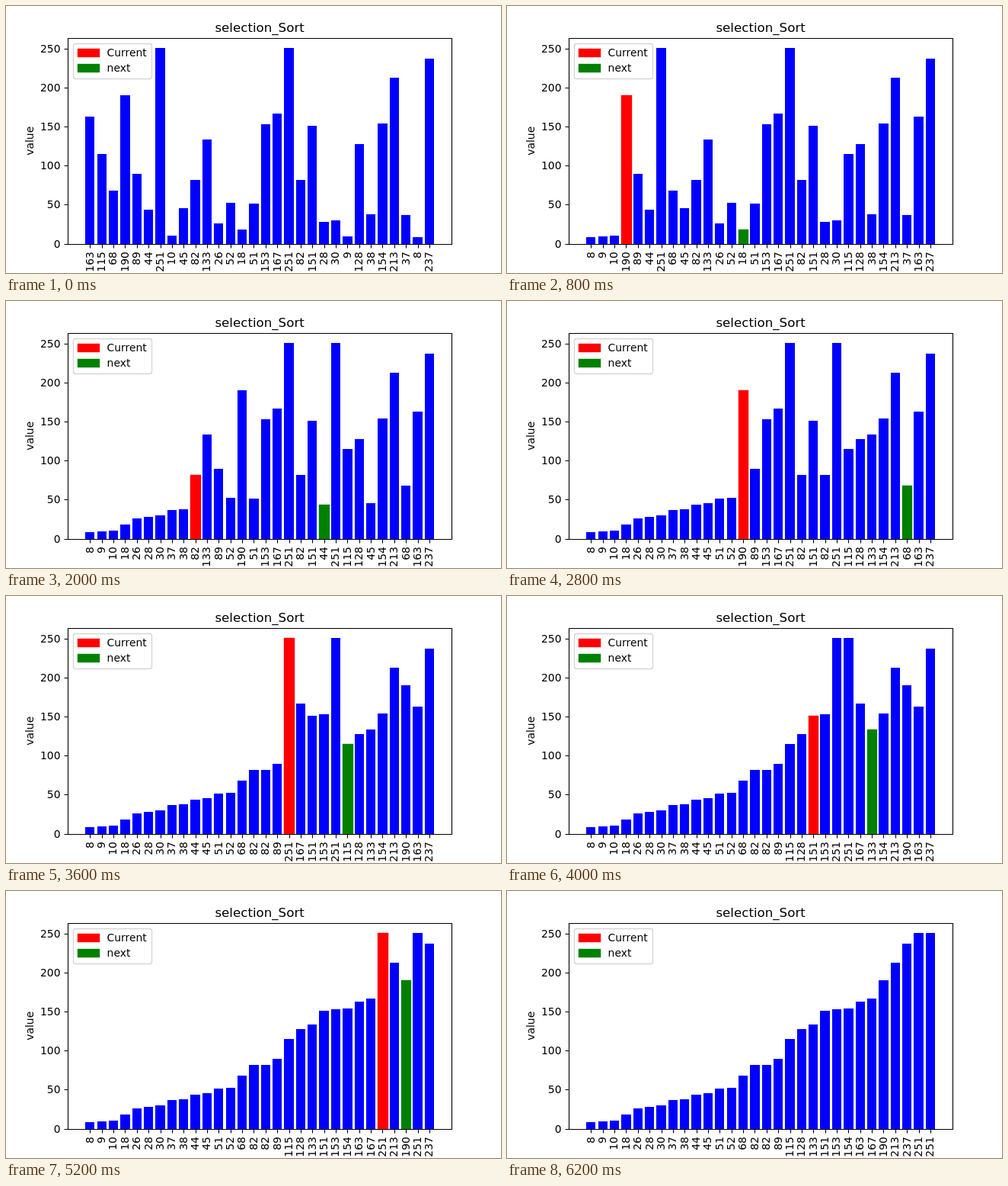
An HTML page that plays this animation: 650 px wide and 350 px high, repeating every 7 s.

```html
<!DOCTYPE html>
<html lang="en">
<head>
<meta charset="utf-8">
<title>Selection sort</title>
<style>
  html, body { margin: 0; width: 100%; height: 100%; overflow: hidden; background: #fff; }
  svg { display: block; }
  text { font: 13.89px "DejaVu Sans", sans-serif; }
  .title { font-size: 16.67px; }
  .axis { fill: none; stroke: #000; stroke-width: 1.11; }
  .mark { stroke-width: 1.39; }
</style>
</head>
<body>
<svg width="650" height="350" viewBox="0 0 650 350">
  <clipPath id="plot"><rect x="81" y="42" width="505" height="270"/></clipPath>
  <g id="bars" clip-path="url(#plot)"></g>
  <g id="axes"></g>
  <g id="labels" text-anchor="end"></g>
  <text class="title" x="333.1" y="34" text-anchor="middle">selection_Sort</text>
  <text transform="translate(36 176.75) rotate(-90)" text-anchor="middle">value</text>
  <rect x="88.5" y="49.5" width="103" height="46" rx="2.8" fill="#fff" stroke="#d6d6d6" stroke-width="1.39"/>
  <rect class="mark" x="94.5" y="56.5" width="28" height="10" fill="red" stroke="red"/>
  <rect class="mark" x="94.5" y="76.5" width="28" height="10" fill="green" stroke="green"/>
  <text x="132.6" y="66">Current</text>
  <text x="132.6" y="86">next</text>
</svg>
<script>
const STEP = 200, LOOP = 7000;
const BASE = 311.5, SCALE = 269.5 / (251 * 1.05);
const PITCH = 503.75 / 32.78, FIRST = 81.25 + 1.89 * PITCH;
const start = [163, 115, 68, 190, 89, 44, 251, 10, 45, 82, 133, 26, 52, 18, 51,
  153, 167, 251, 82, 151, 28, 30, 9, 128, 38, 154, 213, 37, 8, 237];

const el = id => document.getElementById(id);
const centre = i => FIRST + i * PITCH;
const level = v => Math.round(BASE - v * SCALE);

// Each state holds the values, the current index and the index of the smallest remaining value.
function sortStates() {
  const a = [...start], last = a.length - 1;
  const states = [{ values: start }];
  let min;
  for (let i = 0; i <= last; i++) {
    if (i < last) min = i;
    for (let j = i + 1; j <= last; j++) if (a[j] < a[min]) min = j;
    states.push({ values: [...a], current: i, next: min });
    [a[i], a[min]] = [a[min], a[i]];
  }
  return [...states, { values: a }];
}

function bar(v, i, color) {
  const left = Math.round(centre(i) - 0.4 * PITCH);
  const right = Math.round(centre(i) + 0.4 * PITCH);
  const top = level(v), shift = color ? 0.5 : 0;
  const paint = color ? `class="mark" fill="${color}" stroke="${color}"` : 'fill="blue"';
  return `<rect x="${left + shift}" y="${top + shift}" width="${right - left}" height="${312 - top}" ${paint}/>`;
}

function label(v, i) {
  const x = Math.round(centre(i) + 4.4);
  return `<text transform="translate(${x} 322.2) rotate(-90)">${v}</text>`;
}

function drawAxes() {
  let path = 'M81.5 42.5H585.5V312.5H81.5Z', text = '';
  for (let v = 0; v <= 250; v += 50) {
    const y = level(v);
    path += `M76.5 ${y + 0.5}h5`;
    text += `<text x="71.5" y="${y + 5}" text-anchor="end">${v}</text>`;
  }
  start.forEach((_, i) => path += `M${Math.round(centre(i)) + 0.5} 312.5v5`);
  el('axes').innerHTML = `<path class="axis" d="${path}"/>${text}`;
}

function draw({ values, current, next }) {
  const color = i => i === next ? 'green' : i === current ? 'red' : '';
  el('bars').innerHTML = values.map((v, i) => bar(v, i, color(i))).join('');
  el('labels').innerHTML = values.map(label).join('');
}

const states = sortStates();
let shown = -1, begin;

function tick(now) {
  begin ??= now;
  const k = Math.min(Math.floor((now - begin) % LOOP / STEP), states.length - 1);
  if (k !== shown) draw(states[shown = k]);
  requestAnimationFrame(tick);
}

drawAxes();
draw(states[0]);
requestAnimationFrame(tick);
</script>
</body>
</html>
```
